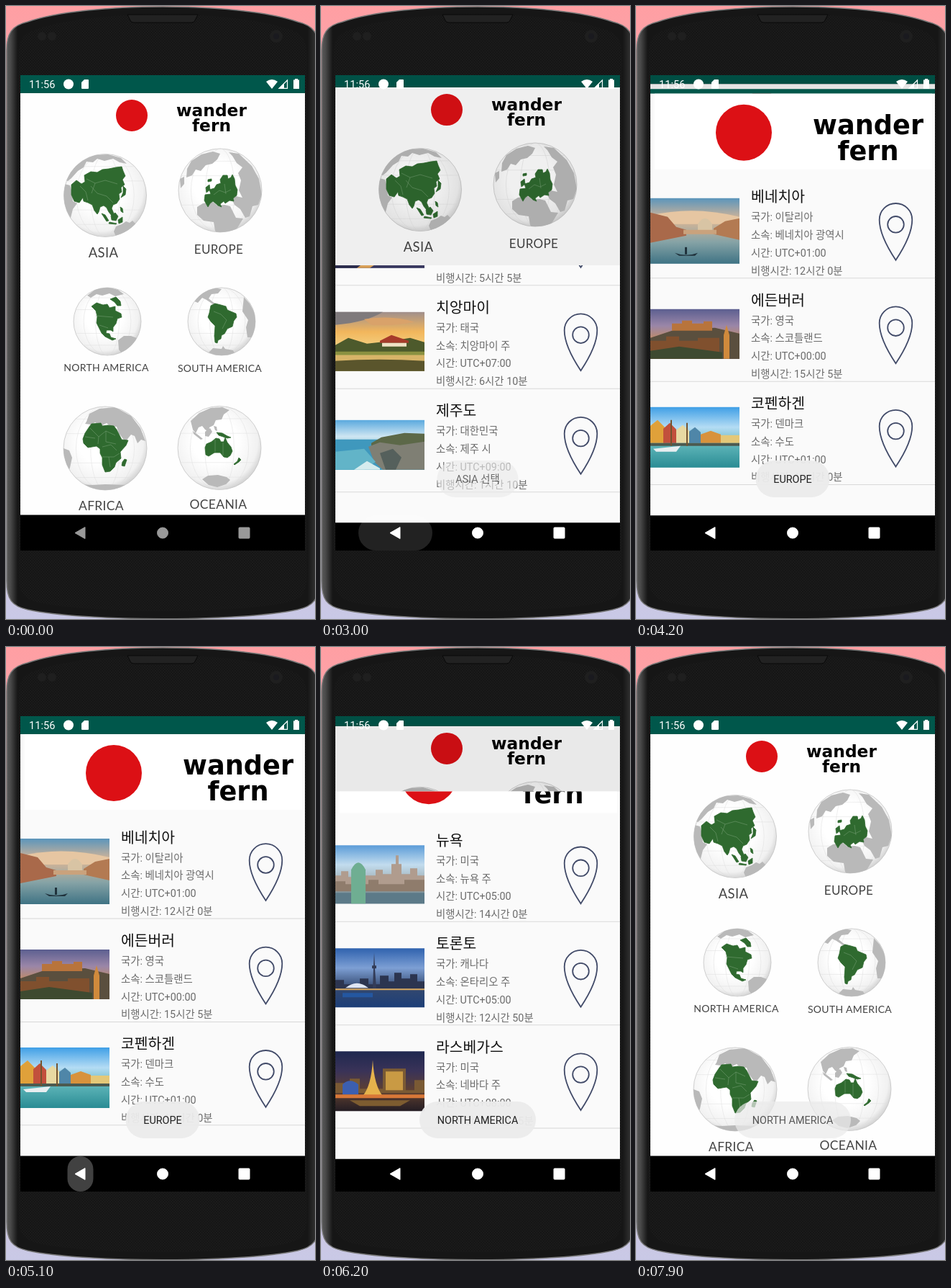
An HTML page for the animation above (8 s loop, 430 px wide and 851 px high).

```html
<!DOCTYPE html>
<html lang="ko">
<head>
<meta charset="utf-8">
<title>City picker</title>
<style>
html, body { margin: 0; width: 100%; height: 100%; overflow: hidden; }
svg { display: block; font-family: Roboto, "Noto Sans CJK KR", "Noto Sans CJK", sans-serif; }
.label { font-family: Lato, sans-serif; fill: #444; text-anchor: middle; letter-spacing: .3px; }
.brand { font-family: "DejaVu Sans", sans-serif; font-weight: bold; text-anchor: middle; }
.title { font-size: 20.4px; fill: #111; }
.info { font-size: 14.4px; fill: #6b6b6b; }
</style>
</head>
<body>
<svg width="430" height="851" viewBox="0 0 430 851">
  <defs>
    <linearGradient id="wall" x2="0" y2="1">
      <stop stop-color="#ff9fa3"/><stop offset="1" stop-color="#c9c9e6"/>
    </linearGradient>
    <linearGradient id="rim">
      <stop stop-color="#5a5a5a"/><stop offset=".012" stop-color="#4a4a4a"/><stop offset=".035" stop-color="#161616"/>
      <stop offset=".965" stop-color="#161616"/><stop offset="1" stop-color="#3c3c3c"/>
    </linearGradient>
    <radialGradient id="ball" cx=".45" cy=".42" r=".6">
      <stop offset=".45" stop-color="#fff"/><stop offset=".85" stop-color="#f1f1f1"/><stop offset="1" stop-color="#cfcfcf"/>
    </radialGradient>
    <pattern id="mesh" width="4" height="4" patternUnits="userSpaceOnUse">
      <path fill="#141414" d="M0 0H4V4H0Z"/><path fill="#1c1c1c" d="M0 0H2V2H0ZM2 2H4V4H2Z"/>
    </pattern>
    <path id="body" d="M1 62C1 38 8 27 30 22C110-6 326-6 406 22C428 27 435 38 435 62V798C435 824 428 833 406 838C326 855 110 855 30 838C8 833 1 824 1 798Z"/>
    <clipPath id="screen"><path d="M20 96H416V756H20Z"/></clipPath>
    <clipPath id="reveal"><rect id="revealBox" x="20" y="96" width="396" height="660"/></clipPath>
    <clipPath id="navClip"><path d="M20 707H416V756H20Z"/></clipPath>
    <g id="bars">
      <path fill="#00574b" d="M20 96H416V121H20Z"/><path d="M20 706.500H416V756H20Z"/>
    </g>
  </defs>

  <path fill="url(#wall)" d="M0 0H430V851H0Z"/>
  <use href="#body" fill="url(#rim)" stroke="#777" stroke-width="1.5"/>
  <use href="#body" fill="url(#mesh)" transform="translate(16.500 10.600) scale(.925 .975)"/>
  <path fill="#222" stroke="#090909" d="M169 12H267L263 20Q262 23 258 23H178Q174 23 173 20Z"/>
  <g fill="#1f1f1f"><circle cx="50" cy="42" r="6"/><circle cx="64" cy="42" r="6"/>
    <circle cx="376" cy="42" r="9"/></g>
  <circle cx="376" cy="42" r="4" fill="#1a1a1f"/>

  <g clip-path="url(#screen)">
    <path d="M20 96H416V756H20Z"/>
    <g id="home"></g>
    <g id="list"><g id="pages" clip-path="url(#reveal)"></g></g>
    <g fill="#fff">
      <text x="32" y="114" font-size="14.6">11:56</text>
      <circle cx="87" cy="108.500" r="7"/>
      <path d="M109 102H114Q115 102 115 103V114Q115 115 114 115H106Q105 115 105 114V106Z"/>
      <path d="M370 115L362 105Q370 99 378 105Z"/>
      <path fill="none" stroke="#fff" stroke-width="1.2" d="M391.500 103V114.400H380Z"/><path d="M387 107V115H379Z"/>
      <path d="M402 101H406V102.500H408V115H400V102.500H402Z"/>
    </g>
    <rect id="ripple" y="707" height="49" fill="#fff" clip-path="url(#navClip)"/>
    <g id="nav" stroke-linejoin="round">
      <path stroke-width="1" d="M110 723.500V739.500L96 731.500Z"/>
      <circle cx="218" cy="731.500" r="7.5"/><rect x="324" y="724" width="15" height="15" rx="1"/>
    </g>
    <g id="toast">
      <rect id="toastBox" y="631" height="51" rx="25.5" fill="#ebebeb" opacity=".95"/>
      <text id="toastText" x="218" y="662" font-size="14.4" fill="#222" text-anchor="middle"></text>
    </g>
  </g>
</svg>
<script>
const $ = id => document.getElementById(id);
const set = (id, attrs) => { for (const k in attrs) $(id).setAttribute(k, attrs[k]); };
const text = (cls, x, y, s, size) => `<text class="${cls}" x="${x}" y="${y}"${size ? ` font-size="${size}"` : ''}>${s}</text>`;
// "colour path|colour path" becomes filled paths
const art = s => s.split('|').map(p => `<path fill="${p.slice(0, 7)}" d="${p.slice(8)}"/>`).join('');
const brand = (cx, cy, r, x, y1, y2, size) => `<circle cx="${cx}" cy="${cy}" r="${r}" fill="#dc1015"/>`
  + text('brand', x, y1, 'wander', size) + text('brand', x, y2, 'fern', size);

// x, y, radius, label, label x, baseline, size, other land, continent, borders
const globes = [
  [138, 263, 57.5, 'ASIA', 135.5, 349, 18.5,
    'M98 220l10-8 14-5 20-1 18 5 8 8-10-2-9-5-12 3-10-3-6 5-9-1-4 8-8 5-9 10-5 4-6-2zM81 247l8 2 3 10 1 12 6 3-6 8-3 12-5 10-18-18zM150 313l3-7 8-3 6-4 5 2 4-3 5 5-8 11-12 7-8-1z',
    'M91 248L98 242 105 247 110 244 109 235 118 230 127 231 134 227 143 226 153 224 161 223 163 229 166 236 162 241 165 248 160 252 161 258 157 261 158 268 154 274 149 276 147 281 150 288 147 291 143 286 140 280 136 277 131 279 129 286 127 289 123 284 120 276 114 273 108 271 107 266 102 273 95 271 91 262ZM133 288l5 2 5 8-3 1zM146 291l6-4 4 5-3 6-6-1zM156 297l6-4 0 7-5 2zM144 300l10 2-1 1-10-1zM159 279l3 2 1 6-3-2zM163 250l4 4-1 8-6 4 3-7z',
    'M112 240l12 6 14-4 17 5M118 250l9 10 13 4 9 9M103 250l8 8 3 12M124 246l-5 14'],
  [298, 256, 58, 'EUROPE', 296, 343.5, 17,
    'M252 226l6-11 14-9 16-4 10 3-4 8-7 6-9 2-7 8-7-2-5 8-8 3zM310 203l14 2 18 17 10 18 4 22-5 14-8 2-4 14-6 2-7-12-8-6-4-8 6-4 9 2-5-10 3-14-4-10 6-8-8-6-6-10zM266 279l8-5 14-2 6 5 10-1 8 2 8 16 10 1-8 13-10 10-14 2-7-8-2-12-14-2-9-8zM242 240l6-3 0 10-5 6z',
    'M276 270l1-8 8-1-2-6 7-2 3-5 6-2-1-5 4-6 6 0 1 5 4-2 2-4 3 6 1 9 3 6-1 8-5 4 1 4-6-1-6 4-2-3-5 4 2 4-5-2-7-6-4 3-3 5zM278 252l5-4 1 7-5 4zM281 241l5-1 0 3-5 1z',
    'M289 262l8-6 8 3 8-4M304 247l2 14'],
  [141, 438, 47, 'NORTH AMERICA', 139.5, 507, 14,
    'M113 402l12-9 16-3 15 4 8 6-12 3-8-4-10 3-8-2-8 5zM156 464l8-6 10 0 8 3-3 12-14 14-8-10z',
    'M119 417l7-5 9 3 6-1 3 5 8-2 0 6 8 4 1 5-6 2-2 7-4 5 0 6-3-2-6 0-1 4 5 1 2 5 7 2-5 2-10-5-5-5-4-8-3-6 1-9-2-8zM145 407l8-3 6 6 1 6-5 0-4-5z', 'M125 430l24 2M130 443l12 4'],
  [300, 438, 47, 'SOUTH AMERICA', 297.5, 507.5, 14,
    'M262 410l12-14 14-5 12 2-5 6-9 1-4 6 6 5 5 3-5 0-9-6-6-3-6 7zM331 404l8 9 7 13 2 16-5 18-7 0-2-14 3-10-8-12zM282 481l6-6 12 1 2-4 3 4 11 2 2 4-18 6z',
    'M285 416l6-3 8 2 7 2 2 5 12 5 1 5-4 5-2 8-7 3-4 7-4 2-1 5-4 2-1 4-3-1-1-9 1-14-6-6-4-6 2-6z', 'M289 424l10 4 8 8-6 12'],
  [138, 614, 58, 'AFRICA', 132.5, 699.5, 17.5,
    'M112 577l4-11 14-7 22-2 22 12 13 17 7 18-6-2-5 5-4-10-5-2-8 10-9-12-3-9-8 0-6-5-8 4-8-5-6 3-8-1zM80 614l8 3 4 10-3 14-4 8-6-18zM104 664l16 1 18-1 30 1-16 9-30 0z',
    'M107 601l3-8 6-9 3-4 13-1 2 4 8-1 8 1 4 5 7 14 9 1-3 7-8 9 1 9-7 6-2 6-6 6-7 1-4-10 0-10-3-6 0-6-5-4-12 2-6-6zM165 629l3 1-3 9-4-1 1-5z',
    'M117 586l12 12 10-8 13 6M129 598l-1 10M139 590l0 15 14 3M134 612l12-3 8 8M134 626l16 0 8-5M143 626l2 14M110 598l14 2'],
  [297, 613.5, 58, 'OCEANIA', 295.5, 697.5, 17.5,
    'M257 576l12-11 16-7 16-1 10 4-8 6-3 7-8 1-3 7-6 3-1 6-5-3-4-5-5 2-4 8-4-5zM260 590l8 6 6 5-3 1-10-8zM277 591l7-5 3 5-5 7-5-1zM289 583l4 1 1 6-3-1zM273 657l8-5 14-1 12 3 5 4-6 6-12 4-12-3z',
    'M277 613l2-5 7-3 6-5 5 1 2 4 4 0 2-6 3 7 5 6 2 6-3 6-4 3-5-1-5-6-8 0-8 5-4-2zM293 592l8 1 7 4 5 2-5 1-12-4zM324 627l3 3-3 3-6 4-1-1 5-4z', 'M291 602l0 17M302 606l0 18'],
];

function globe([x, y, r, name, lx, ly, size, land, green, borders], i) {
  const rings = [.35, .7].map(k => `<ellipse cx="${x}" cy="${y}" rx="${r * k}" ry="${r}"/><path d="M${x - r} ${y - r * k}h${2 * r}m0 ${2 * r * k}h${-2 * r}"/>`).join('');
  return `<clipPath id="g${i}"><circle cx="${x}" cy="${y}" r="${r}"/></clipPath>
    <circle cx="${x}" cy="${y}" r="${r}" fill="url(#ball)" stroke="#c4c4c4" stroke-width=".8"/>
    <g clip-path="url(#g${i})"><g fill="none" stroke="#ddd" stroke-width=".5">${rings}</g>
    <path fill="#b9b9b9" d="${land}"/><path fill="#2f6a2f" stroke="#2f6a2f" stroke-width=".8" stroke-linejoin="round" d="${green}"/>
    <path fill="none" stroke="#7fa57d" stroke-width=".5" d="${borders}"/></g>` + text('label', lx, ly, name, size);
}

// rows: city, country, region, offset, flight, photo top, photo height, backdrop colours, shapes
const trips = [
  { open: 1090, back: 2850, close: 2930, toastIn: 1060, toastOut: [2900, 3200], toast: 'ASIA 선택', toastWidth: 113, rows: [
    ['하노이', '베트남', '중앙직할 시', '07:00', '5시간 5분', 270, 83, '#2c4580 #6f7db0 #7a6a86 #33345c',
      '#463c58 M0 36V24H10V28H24V17H32V28H48V21H58V29H88V24H98V31H124V42H0Z|#e8a860 M0 38H124V42H0Z|#b58a84 M0 42H124V46H0Z|#2b2c4c M0 83V62L40 52 60 58 30 83Z|#d9a057 M30 83L66 56 124 48V52L76 64 48 83Z'],
    ['치앙마이', '태국', '치앙마이 주', '07:00', '6시간 10분', 414, 82, '#a08f8c #f2b65c #f4d78a #8c8440',
      '#7f7a7c M0 0H66Q44 14 0 18Z|#d9a26a M40 10Q80 4 110 14Q80 20 50 18Z|#4d5a2c M0 46L18 36 44 44 80 40 104 36 124 42V58H0Z|#a63b2a M62 40L78 32 102 40V43H62Z|#efe1c4 M65 43H99V48H65Z|#8b9140 M0 55H124V60H0Z|#d8b468 M0 60H124V68H0Z|#5a552c M0 68Q60 64 124 68V82H0Z'],
    ['제주도', '대한민국', '제주 시', '09:00', '1시간 10분', 564, 69, '#5aa9de #cfe6f2 #57acc6 #3d99ae',
      '#3f98bd M0 27H124V69H0Z|#5c6848 M50 32L64 24 96 18 124 19V40H50Z|#7f7f74 M46 37L62 31 90 35 124 30V69H66L54 58Z|#55605c M62 46L80 40 92 52 84 69H70Z|#62b4c8 M0 44L40 40 56 58 40 69H0Z|#d5ecee M26 69L44 57 62 67V69Z'],
  ] },
  { open: 3890, back: 5060, close: 5150, toastIn: 3800, toastOut: [5700, 5950], toast: 'EUROPE', toastWidth: 103, rows: [
    ['베네치아', '이탈리아', '베네치아 광역시', '01:00', '12시간 0분', 266, 91, '#5b95bb #d9b696 #86a3a6 #3f7384',
      '#e6c6a2 M0 24Q60 10 124 26V36H0Z|#a9694a M0 20L24 26 36 40 50 44V52L0 62Z|#d8c4a4 M66 46V36Q76 20 86 36V46Z|#b37a52 M88 42L104 32 124 28V58L88 50Z|#caa27c M46 44H92V50H46Z|#20323c M34 76Q50 82 66 76L62 80H40Z|#20323c M48 68H51V78H48Z'],
    ['에든버러', '영국', '스코틀랜드', '00:00', '15시간 5분', 420, 69, '#5c5f90 #9a86a8 #c78c5a #4f3c30',
      '#5a4f3e M0 40L36 28 90 26 124 34V69H0Z|#b8743c M30 28V20H44V16H58V20H74V17H86V30H30Z|#80502e M0 44H22V38H40V44H66V40H96V69H0Z|#d08a3c M102 69V36L106 22 110 36V69Z|#3e4a30 M0 58L40 52 100 60V69H0Z'],
    ['코펜하겐', '덴마크', '수도', '01:00', '13시간 0분', 556, 84, '#3f9fe6 #b4dcf4 #58b0b4 #2a8c94',
      '#e0a13a M0 50V26L10 18 20 28V50Z|#c2503c M18 50V30L27 22 36 31V50Z|#e8d9a2 M36 50V32L45 25 54 33V50Z|#4f86a8 M54 50V34L62 28 70 35V50Z|#d8923c M70 50V38L84 33 98 38V50Z|#e4c878 M98 50V39H124V50Z|#4c5a50 M0 50H124V54H0Z|#e8eef0 M4 58L42 54 36 62H8Z|#74532f M28 54V18H30V54ZM50 54V22H52V54Z'],
  ] },
  { open: 6010, back: 7030, close: 7140, toastIn: 5970, toastOut: [7850, 8050], toast: 'NORTH AMERICA', toastWidth: 162, rows: [
    ['뉴욕', '미국', '뉴욕 주', '05:00', '14시간 0분', 271, 81, '#5b9cd8 #c2dcee #9aa8ac #5f7c8a',
      '#b09c8e M0 60V42H8V36H18V44H28V30H36V42H56V34H66V40H78V26H84V14H88V26H92V40H104V32H114V42H124V60Z|#8f7c6c M0 64V50H14V54H46V48H60V54H96V48H124V64Z|#5c7a88 M0 66H124V81H0Z|#6fae92 M22 81V34Q32 14 42 34V81Z'],
    ['토론토', '캐나다', '온타리오 주', '05:00', '12시간 50분', 414, 82, '#2f62ae #7d9fd4 #33486f #1d3f78',
      '#2c3550 M0 56V44H12V50H34V42H46V50H62V38H74V46H82V34H92V42H104V36H114V46H124V56Z|#333c58 M52 56L53 28H51V24H53L54 6 55 24H57V28H55L57 56Z|#dfe6f4 M14 55Q30 42 46 55Z|#d9a85e M0 56H124V58H0Z|#2457a0 M10 62H52V68H10Z'],
    ['라스베가스', '미국', '네바다 주', '08:00', '13시간 45분', 557, 83, '#1f2850 #3a3358 #5f4030 #241d24',
      '#7a5a34 M0 58V44H20V38H34V52H66V24H98V54H110V40H124V58Z|#3c5fb0 M10 60V46Q20 36 32 46V60Z|#c99a44 M70 54V28H94V54Z|#e6b34c M38 62Q50 48 52 12Q54 48 66 62Z|#d87838 M0 60H124V65H0Z|#7d5c30 M20 68H104L90 76H34Z'],
  ] },
];

function row([city, country, region, zone, flight, top, h, colours, shapes], i, id) {
  const y = 271.5 + 143.4 * i;
  const info = [`국가: ${country}`, `소속: ${region}`, `시간: UTC+${zone}`, `비행시간: ${flight}`];
  const stops = colours.split(' ').map((c, k) => `<stop offset="${k / 3}" stop-color="${c}"/>`).join('');
  return `<linearGradient id="${id}" x2="0" y2="1">${stops}</linearGradient>
    <g transform="translate(20 ${top})"><rect width="124" height="${h}" fill="url(#${id})"/>${art(shapes)}</g>
    ${text('title', 160, y, city)}${info.map((s, k) => text('info', 160, y + 26 + 24.8 * k, s)).join('')}
    <path fill="#d8d8d8" d="M20 ${y + 105}h396v1h-396z"/>
    <g transform="translate(361.5 ${y + 24.5})" fill="none" stroke="#414a68" stroke-width="1.8">
      <path d="M0 56C-10 41-22.800 19-22.800 0A22.800 22.800 0 0 1 22.800 0C22.800 19 10 41 0 56Z"/><circle cy="6.500" r="11.300"/></g>`;
}

$('home').innerHTML = '<use href="#bars"/><path fill="#fefefe" d="M20 121H416V706.500H20Z"/>'
  + brand(175, 152, 22, 286, 153, 174, 23.3) + globes.map(globe).join('');
$('pages').innerHTML = '<use href="#bars"/><path fill="#fafafa" d="M20 121H416V706.500H20Z"/><path fill="#fff" d="M26 121H412V226H26Z"/>'
  + brand(150, 175, 39, 323, 177, 213, 36.7)
  + trips.map((trip, n) => `<g id="trip${n}">${trip.rows.map((r, i) => row(r, i, `photo${n}${i}`)).join('')}</g>`).join('');

const LOOP = 8000, STEP = 100, SLIDE = 425, HEIGHT = 660;
const clamp = v => Math.max(0, Math.min(1, v));

// cubic-bezier(.2, 0, 0, 1)
function ease(x) {
  if (x <= 0 || x >= 1) return clamp(x);
  let lo = 0, hi = 1, s;
  for (let i = 0; i < 24; i++) {
    s = (lo + hi) / 2;
    if (.6 * s * (1 - s) ** 2 + s ** 3 < x) lo = s; else hi = s;
  }
  return 3 * s * s * (1 - s) + s ** 3;
}

function draw(t) {
  const n = t < 3600 ? 0 : t < 5960 ? 1 : 2, trip = trips[n];
  const shown = ease((t - trip.open) / SLIDE) - ease((t - trip.close) / SLIDE);
  const hidden = 1 - shown;
  set('home', { transform: `translate(0 ${-.02 * HEIGHT * shown})`, opacity: 1 - .1 * shown });
  set('list', { transform: `translate(0 ${.041 * HEIGHT * hidden})`, visibility: shown > 0 ? 'visible' : 'hidden' });
  set('revealBox', { y: 96 + .959 * HEIGHT * hidden, height: HEIGHT * (1 - .959 * hidden) });
  trips.forEach((_, i) => set('trip' + i, { display: i === n ? 'inline' : 'none' }));

  const [fade, gone] = trip.toastOut;
  set('toast', { opacity: clamp((t - trip.toastIn) / 230) * clamp((gone - t) / (gone - fade)) });
  set('toastBox', { x: 218 - trip.toastWidth / 2, width: trip.toastWidth });
  $('toastText').textContent = trip.toast;

  const age = t - trip.back, w = Math.max(0, Math.min(103, 8 + .7 * age));
  set('ripple', { x: 103.5 - w / 2, width: w, rx: Math.min(w / 2, 24.5), opacity: age > 0 ? clamp(.3 - age * .0011) : 0 });
  const ink = t < 2900 ? '#999' : '#fff';
  set('nav', { fill: ink, stroke: ink });
}

function tick() {
  draw(Math.floor(performance.now() % LOOP / STEP) * STEP);
  requestAnimationFrame(tick);
}
tick();
</script>
</body>
</html>
```
